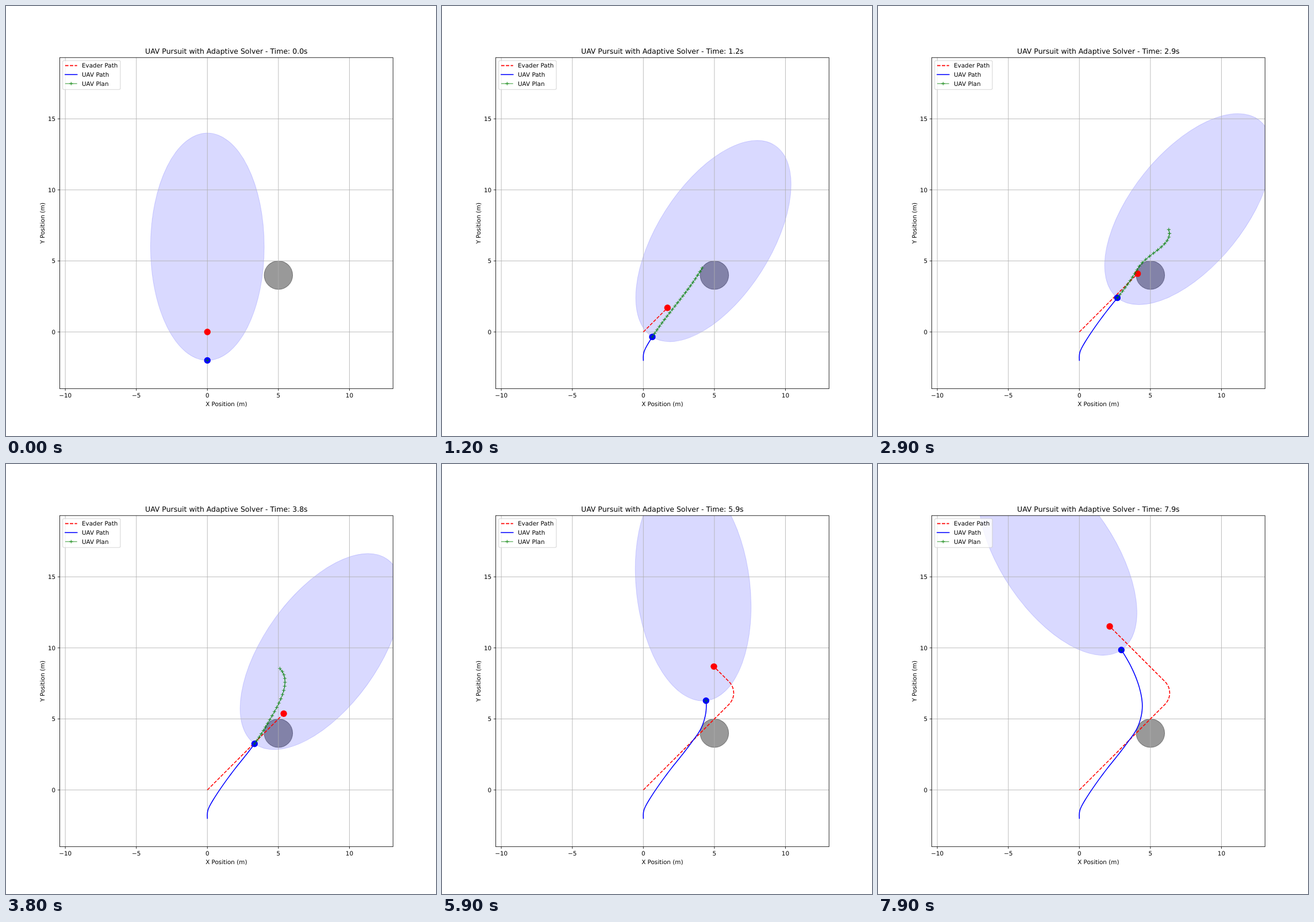
Recreate the animation shown at these times as an HTML page. Size 748 px wide and 748 px high, loop 8 s.

```html
<!DOCTYPE html>
<html lang="en">
<head>
<meta charset="utf-8">
<title>Pursuit plot</title>
<style>
  html, body { margin: 0; width: 100%; height: 100%; overflow: hidden; background: #fff; }
  svg { display: block; width: 748px; height: 748px; }
  text { font: 10.39px "DejaVu Sans", sans-serif; fill: #000; text-rendering: geometricPrecision; }
  .title { font-size: 12.47px; }
  .mid { text-anchor: middle; }
  .end { text-anchor: end; }
  .grid { stroke: #b0b0b0; stroke-width: .83; }
  .axis { stroke: #000; stroke-width: .83; fill: none; }
  .evader { stroke: #f00; stroke-width: 1.56; stroke-dasharray: 5.77 2.49; fill: none; }
  .uav { stroke: #00f; stroke-width: 1.56; stroke-linecap: square; stroke-linejoin: round; fill: none; }
  .plan { stroke: #008000; stroke-opacity: .8; stroke-width: 1.04; fill: none; }
</style>
</head>
<body>
<svg id="plot" viewBox="0 0 748 748">
  <defs><clipPath id="area"><rect x="93.5" y="89.8" width="579.7" height="575.9"/></clipPath></defs>
  <g clip-path="url(#area)">
    <circle id="obstacle" fill-opacity=".4" stroke="#000" stroke-opacity=".4" stroke-width="1.04"/>
    <ellipse id="view" fill="#00f" fill-opacity=".15" stroke="#00f" stroke-opacity=".15" stroke-width="1.04"/>
    <g id="grid"></g>
    <polyline id="evaderPath" class="evader"/>
    <polyline id="uavPath" class="uav"/>
    <circle id="evaderDot" r="5.7" fill="#f00"/>
    <circle id="uavDot" r="5.7" fill="#00f"/>
    <polyline id="planLine" class="plan"/>
    <path id="planMarks" class="plan"/>
  </g>
  <rect class="axis" x="93.5" y="89.8" width="579.7" height="575.9"/>
  <g id="ticks"></g>
  <text class="mid" x="383.3" y="696">X Position (m)</text>
  <text class="mid" transform="translate(66.6 377.8) rotate(-90)">Y Position (m)</text>
  <text id="title" class="mid title" x="383.3" y="83.4"></text>
  <rect x="98.7" y="95" width="100.2" height="50.2" rx="2.1" fill="#fff" fill-opacity=".8" stroke="#ccc" stroke-opacity=".8" stroke-width="1.04"/>
  <g id="legend"></g>
</svg>
<script>
const SCALE = 24.715, LOOP = 8000, STEP = 100;
const OBSTACLE = [5, 4], HORIZON = 2, PLAN_STEPS = 20;
const $ = id => document.getElementById(id);
const px = x => 350.3 + SCALE * x;
const py = y => 567 - SCALE * y;
const rad = deg => deg * Math.PI / 180;
const polar = (r, angle) => [r * Math.cos(angle), r * Math.sin(angle)];
const add = (p, q) => [p[0] + q[0], p[1] + q[1]];
const sub = (p, q) => [p[0] - q[0], p[1] - q[1]];
const dist = (p, q) => Math.hypot(...sub(p, q));
const angleOf = v => Math.atan2(v[1], v[0]);
const set = (el, attrs) => { for (const k in attrs) el.setAttribute(k, attrs[k]); };
const screen = ([x, y]) => [px(x).toFixed(2), py(y).toFixed(2)];
const points = list => list.map(p => screen(p).join()).join(' ');

// The pursuer passes the obstacle at this point of its rim, along the tangent.
const GATE = add(OBSTACLE, polar(1, rad(150)));
const GATE_HEADING = rad(60);

const pose = (t, x, y, deg) => ({ t, at: [x, y], heading: rad(deg) });
const POSES = [
  pose(0, 0, -2, 90),
  pose(.6, .01, -1.55, 84),
  pose(1.2, .63, -.35, 57.5),
  pose(2.2, 2.035, 1.606, 51.7),
  pose(3.8, 3.32, 3.25, 54.2),
  pose(4.8, ...GATE, 67.9),
  pose(5.9, 4.41, 6.28, 96.5),
  pose(7.9, 2.955, 9.85, 124)
];

// Speed at a pose is the mean of the average speeds on both sides.
POSES.forEach((p, i) => {
  const sides = [POSES[i - 1], POSES[i + 1]].filter(Boolean)
    .map(q => dist(p.at, q.at) / Math.abs(p.t - q.t));
  p.speed = sides.reduce((a, b) => a + b) / sides.length;
});

function hermite(p, m, q, n, k) {
  const k2 = k * k, k3 = k2 * k;
  return p.map((v, i) =>
    (2 * k3 - 3 * k2 + 1) * v + (k3 - 2 * k2 + k) * m[i] + (3 * k2 - 2 * k3) * q[i] + (k3 - k2) * n[i]);
}

function uavAt(t) {
  let i = 0;
  while (i < POSES.length - 2 && t >= POSES[i + 1].t) i++;
  const a = POSES[i], b = POSES[i + 1], d = b.t - a.t;
  return hermite(a.at, polar(a.speed * d, a.heading), b.at, polar(b.speed * d, b.heading), (t - a.t) / d);
}

const headingOf = (path, t) => angleOf(sub(path(t + .001), path(t - .001)));

// Straight north-east, a quarter turn, then straight north-west at 2 m/s.
function evaderAt(t) {
  const corner = 6.825, r = 1.125, half = Math.SQRT1_2;
  const before = corner / half - r, arc = r * Math.PI / 2, s = 2 * t;
  if (s <= before) return [s * half, s * half];
  if (s <= before + arc) {
    const center = [corner - r * Math.SQRT2, corner];
    return add(center, polar(r, (s - before) / r - Math.PI / 4));
  }
  const rest = (r + s - before - arc) * half;
  return [corner - rest, corner + rest];
}

// Even steps towards the evader's predicted place, by way of the gate.
function planAt(t, start, heading) {
  if (t === 0 || start[1] >= GATE[1]) return [start];
  let aim = evaderAt(t + HORIZON);
  if (dist(aim, OBSTACLE) < 1) aim = GATE;
  const direct = aim[1] < GATE[1];
  const turn = direct ? aim : GATE;
  const turnHeading = direct ? angleOf(sub(aim, start)) : GATE_HEADING;
  const first = dist(start, turn), second = dist(turn, aim);
  const aimHeading = headingOf(evaderAt, t + HORIZON);
  return Array.from({ length: PLAN_STEPS + 1 }, (_, n) => {
    const s = n / PLAN_STEPS * (first + second);
    return s <= first
      ? hermite(start, polar(first, heading), turn, polar(first, turnHeading), s / first)
      : hermite(turn, polar(second, turnHeading), aim, polar(second, aimHeading), (s - first) / second);
  });
}

const plus = (x, y) => `M${x} ${y}m-3.1 0h6.2m-3.1 -3.1v6.2`;

function drawAxes() {
  const label = v => String(v).replace('-', '\u2212');
  let grid = '', ticks = '', legend = '';
  for (let v = -10; v <= 15; v += 5) {
    const x = px(v), y = py(v);
    if (v <= 10) {
      grid += `<path class="grid" d="M${x} 89.8V665.7"/>`;
      ticks += `<path class="axis" d="M${x} 665.7v3.64"/><text class="mid" x="${x}" y="681">${label(v)}</text>`;
    }
    if (v >= 0) {
      grid += `<path class="grid" d="M93.5 ${y}H673.2"/>`;
      ticks += `<path class="axis" d="M93.5 ${y}h-3.64"/><text class="end" x="86.2" y="${y + 3.9}">${label(v)}</text>`;
    }
  }
  ['Evader Path', 'UAV Path', 'UAV Plan'].forEach((name, i) => {
    const y = 103.6 + 15.7 * i, kind = ['evader', 'uav', 'plan'][i];
    legend += `<path class="${kind}" d="M102.9 ${y}h20.8"/><text x="132" y="${y + 3.7}">${name}</text>`;
    if (kind === 'plan') legend += `<path class="plan" d="${plus(113.3, y)}"/>`;
  });
  $('grid').innerHTML = grid;
  $('ticks').innerHTML = ticks;
  $('legend').innerHTML = legend;
  set($('obstacle'), { cx: px(OBSTACLE[0]), cy: py(OBSTACLE[1]), r: SCALE });
}

function render(tick) {
  const t = tick / 10, times = Array.from({ length: tick + 1 }, (_, i) => i / 10);
  const uav = uavAt(t), evader = evaderAt(t), heading = headingOf(uavAt, t);
  const plan = planAt(t, uav, heading);
  const [cx, cy] = screen(add(uav, polar(8, heading)));
  const turn = -heading * 180 / Math.PI;
  set($('view'), { cx, cy, rx: 8 * SCALE, ry: 4 * SCALE, transform: `rotate(${turn} ${cx} ${cy})` });
  set($('evaderPath'), { points: points(times.map(evaderAt)) });
  set($('uavPath'), { points: points(times.map(uavAt)) });
  set($('evaderDot'), { cx: px(evader[0]), cy: py(evader[1]) });
  set($('uavDot'), { cx: px(uav[0]), cy: py(uav[1]) });
  set($('planLine'), { points: points(plan) });
  set($('planMarks'), { d: plan.map(p => plus(...screen(p))).join('') });
  $('title').textContent = `UAV Pursuit with Adaptive Solver - Time: ${t.toFixed(1)}s`;
}

const origin = performance.now();
let shown = -1;
function frame() {
  const tick = Math.floor((performance.now() - origin) % LOOP / STEP);
  if (tick !== shown) render(shown = tick);
  requestAnimationFrame(frame);
}
drawAxes();
frame();
</script>
</body>
</html>
```
